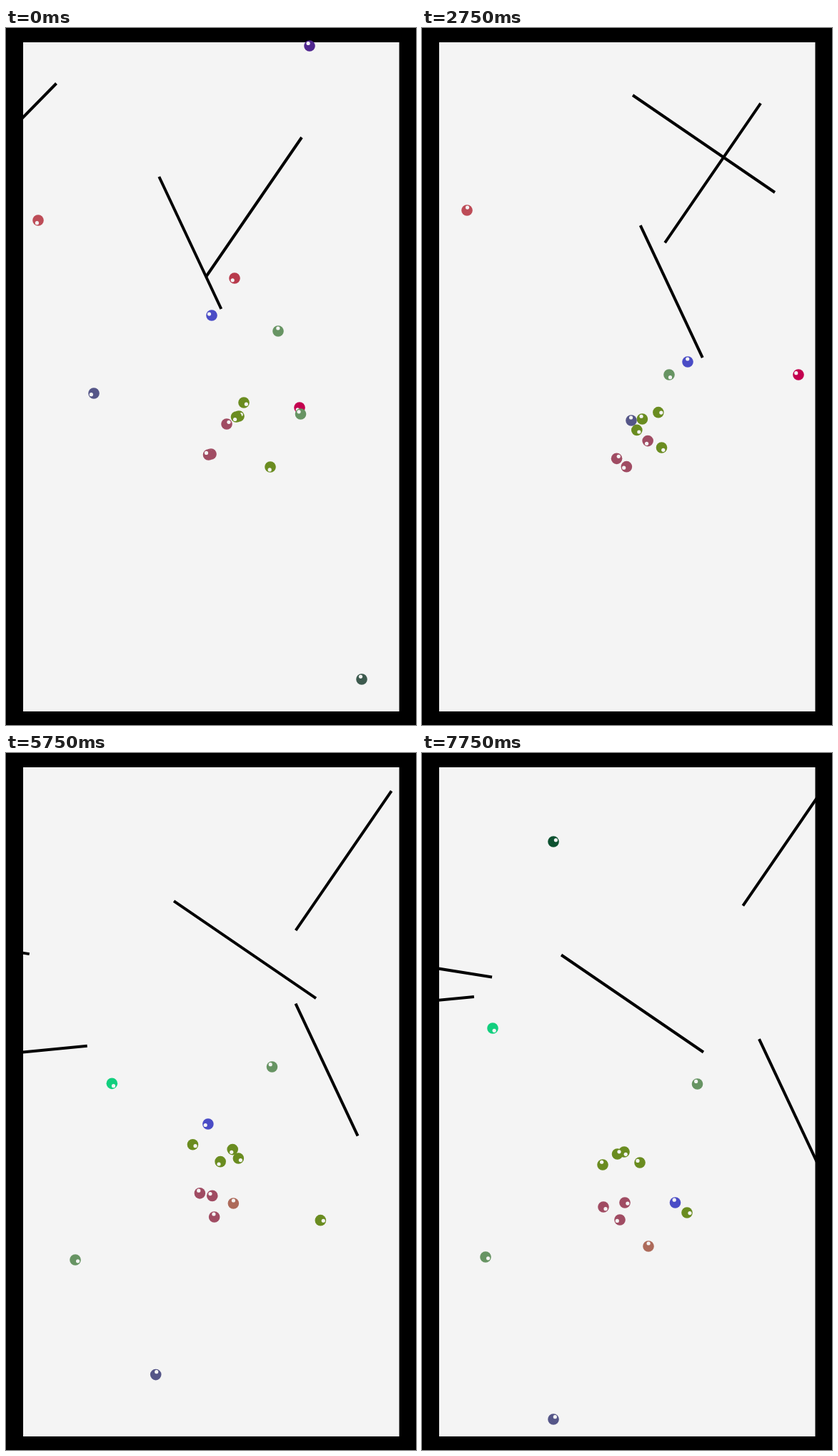
Write an HTML page with a canvas that moves like this. It is 574 px wide and 975 px high and loops after 8 s.

```html
<!DOCTYPE html>
<html lang="en">
<head>
<meta charset="utf-8">
<title>Wandering balls</title>
<style>
  html, body { margin: 0; width: 100%; height: 100%; overflow: hidden; background: #000; }
  canvas { display: block; }
</style>
</head>
<body>
<canvas id="stage" width="574" height="975"></canvas>
<script>
const ctx = document.getElementById('stage').getContext('2d');
const LOOP = 8000, STEP = 250, LAST = LOOP - STEP;
const RADIUS = 7.8, PAPER = '#f4f4f4';
const OLIVE = '#6a8c20', MAROON = '#a04c63', SAGE = '#679463';
const KNOTS = [0, 1750, 2750, 4000, 5000, 6250, LAST];
const balls = [], bars = [];

let seed = 11;
function random() {
  seed = (seed * 16807) % 2147483647;
  return seed / 2147483647;
}

// A bar slides at constant speed, in px per second.
function bar(x1, y1, x2, y2, vx, vy, from = 0) {
  bars.push({ x1, y1, x2, y2, vx, vy, from });
}

// A roamer follows a smooth curve through a few points.
function roamer(color, points, from = 0, to = LOOP, times = KNOTS) {
  balls.push({ color, points, times, from, to, place: t => spline(points, times, t) });
}

// A newcomer drifts between its last two points.
function newcomer(color, points, from = 5750) {
  roamer(color, points, from, LOOP, KNOTS.slice(-2));
}

// A swarm member sways around a straight drift, at rest at both ends of it.
function swarmer(color, x1, y1, x2, y2, sway) {
  const wave = () => {
    const turns = 3 + Math.floor(random() * 4);
    const size = sway * (0.6 + 0.4 * random()) * (random() < 0.5 ? -1 : 1);
    return s => size * Math.sin(turns * Math.PI * s);
  };
  const waveX = wave(), waveY = wave();
  const place = t => {
    const s = t / LAST;
    return [x1 + (x2 - x1) * s + waveX(s), y1 + (y2 - y1) * s + waveY(s)];
  };
  balls.push({ color, from: 0, to: LOOP, place });
}

// Cubic Hermite curve whose tangents come from the neighbouring points.
function spline(points, times, t) {
  const last = points.length - 1;
  let i = 0;
  while (i < last - 1 && t >= times[i + 1]) i++;
  const span = times[i + 1] - times[i];
  const s = (t - times[i]) / span, r = 1 - s;
  const tangent = (k, axis) => {
    const a = Math.max(k - 1, 0), b = Math.min(k + 1, last);
    return span * (points[b][axis] - points[a][axis]) / (times[b] - times[a]);
  };
  return [0, 1].map(axis => {
    const p = points[i][axis], q = points[i + 1][axis];
    return p + (q - p) * s * s * (3 - 2 * s)
      + s * r * (tangent(i, axis) * r - tangent(i + 1, axis) * s);
  });
}

bar(414, 153, 280, 348, 21.85, -17.35);
bar(214.3, 208, 301.3, 393, 33.25, 24.8);
bar(70.5, 77.5, -29.5, 179.5, -25.7, 18.8);
bar(350, -9.7, 549, 126.3, -20, 37.7, 2500);
bar(128, 617.5, 231, 607.5, -20.4, -34.4, 4750);
bar(-305, 164, -155, 188, 32.65, 16.2, 5250);

roamer('#50278f', [[425, 25], [455, 80]], 0, 750);
roamer('#3d5a4e', [[498, 911], [516, 955]], 0, 1000);
roamer('#b83a4c', [[320, 350], [350, 320]], 0, 1000);
roamer('#bd4c57', [[45, 269], [55, 246], [63, 255], [48, 298], [49, 278], [50, 262]], 0, 5750);
roamer('#c3004f', [[411, 531], [492, 445], [527, 485], [522, 466], [543, 491]], 0, 5500);
roamer(SAGE, [[412.5, 540], [440, 575]], 0, 1000);
roamer(SAGE, [[381, 424], [385, 518], [346, 485], [362.5, 463], [369, 439], [375, 443], [385.5, 463]]);

swarmer(OLIVE, 333, 524, 253, 576, 24);
swarmer(OLIVE, 326, 543, 305, 573, 24);
swarmer(OLIVE, 370, 614, 283, 558, 24);
swarmer(OLIVE, 322.5, 544, 273.5, 561, 24);
swarmer(MAROON, 309, 554, 284, 629, 18);
swarmer(MAROON, 287, 596, 254, 635, 18);
swarmer(MAROON, 283.5, 597, 277, 653, 18);

roamer('#4a4cc6', [[288, 402], [317, 418], [372, 467], [326, 572], [244, 548], [316, 516], [354.5, 629]]);
roamer('#555688', [[123, 511], [242, 458], [293, 549], [266, 681], [232.5, 784], [198, 912], [184, 932]]);
newcomer(OLIVE, [[423, 651], [371, 643]]);
newcomer('#12cf7e', [[136, 443], [99, 385]]);
newcomer('#0d5130', [[317, 38], [184, 124]], 6250);
newcomer('#ad6a5a', [[318, 645], [317, 690]]);
newcomer(SAGE, [[95, 708], [89, 705]]);

function disc(x, y, r, color) {
  ctx.fillStyle = color;
  ctx.beginPath();
  ctx.arc(x, y, r, 0, 2 * Math.PI);
  ctx.fill();
}

// The shine sits on the side away from the heading.
function drawBall({ color, place }, t) {
  const [x, y] = place(t);
  const [x1, y1] = place(t - 10), [x2, y2] = place(t + 10);
  const shine = Math.atan2(y1 - y2, x1 - x2);
  disc(x, y, RADIUS, color);
  disc(x + 4 * Math.cos(shine), y + 4 * Math.sin(shine), 2.6, PAPER);
}

function drawBar(b, t) {
  const dx = b.vx * t / 1000, dy = b.vy * t / 1000;
  ctx.beginPath();
  ctx.moveTo(b.x1 + dx, b.y1 + dy);
  ctx.lineTo(b.x2 + dx, b.y2 + dy);
  ctx.stroke();
}

function draw(t) {
  ctx.fillStyle = '#000';
  ctx.fillRect(0, 0, 574, 975);
  ctx.fillStyle = PAPER;
  ctx.fillRect(24, 20, 526.5, 936);
  for (const b of balls) if (t >= b.from && t < b.to) drawBall(b, t);
  ctx.strokeStyle = '#000';
  ctx.lineWidth = 4;
  for (const b of bars) if (t >= b.from) drawBar(b, t);
}

const start = performance.now();
function tick() {
  const t = (performance.now() - start) % LOOP;
  draw(Math.floor(t / STEP) * STEP);
  requestAnimationFrame(tick);
}
tick();
</script>
</body>
</html>
```
